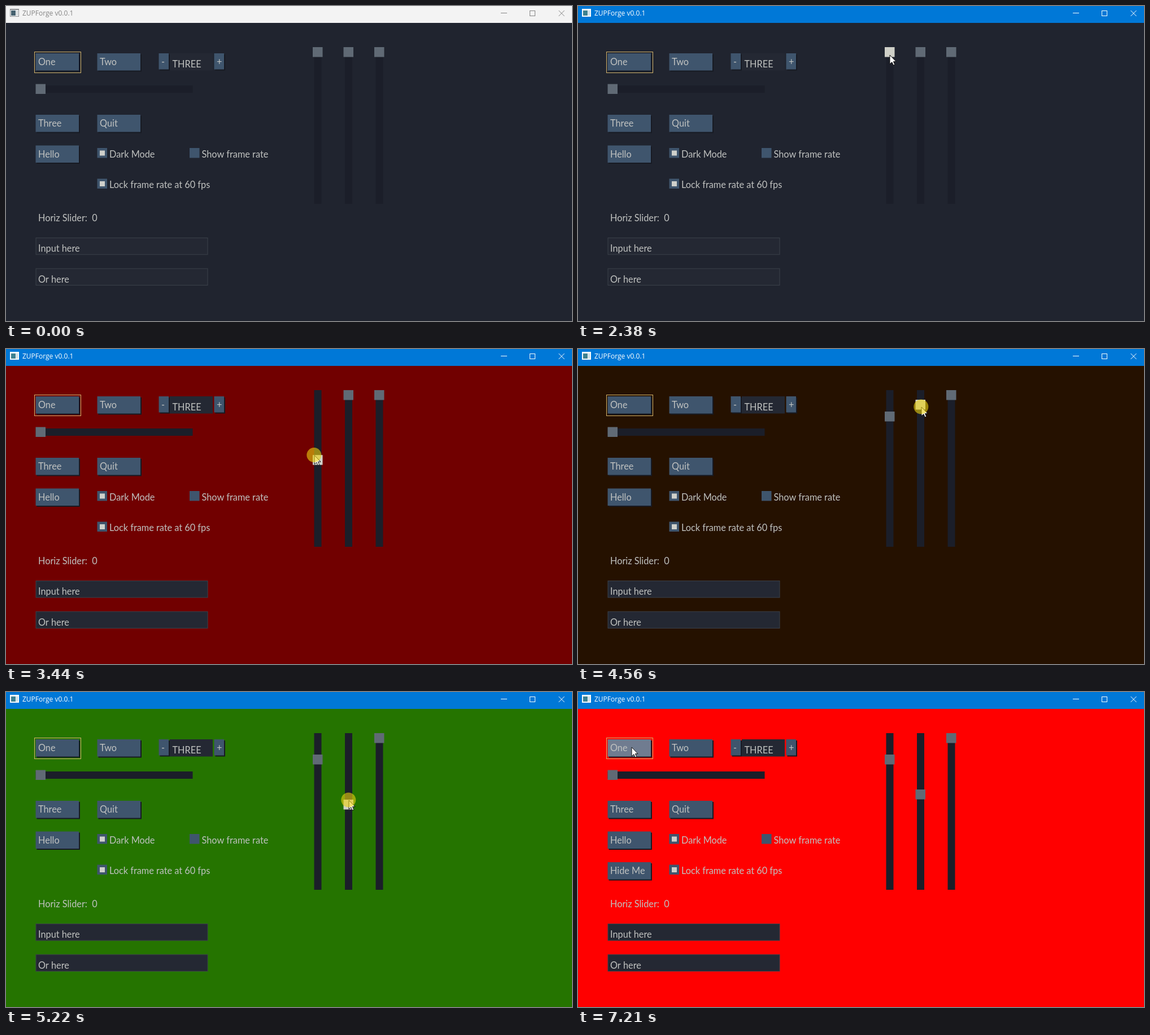
Recreate the animation shown at these times as an HTML page with a canvas. Size 1002 by 559 pixels, loop 8 s.

```html
<!DOCTYPE html>
<html lang="en">
<head>
<meta charset="utf-8">
<title>ZUPForge v0.0.1</title>
<style>
html, body { margin: 0; width: 100%; height: 100%; overflow: hidden; background: #20242f; }
canvas { display: block; }
</style>
</head>
<body>
<canvas id="stage" width="1002" height="559"></canvas>
<script>
const ctx = document.getElementById('stage').getContext('2d');
const LOOP = 8000, START = 320, STEP = 66.2;
const CELL = 54.5, BOX = 17.5, RANGE = 260;

const ACTIVATE = 16, CLICKED = 104;
const DRAGS = [{ from: 34, to: 56 }, { from: 63, to: 78 }, null];
const PRESSES = [{ from: ACTIVATE, to: 24 }, DRAGS[0], DRAGS[1], { from: 103, to: CLICKED }];

// Pointer waypoints: step, x, y
const PATH = [
  [0, 867, 541], [12, 552, 87],
  [16, 552, 87], [22, 552, 189], [31, 552, 87],
  [34, 552, 87], [41, 546, 240], [55, 546, 120],
  [59, 608, 79], [62, 608, 79], [63, 608, 99], [64, 608, 103], [65, 608, 171], [66, 608, 191],
  [69, 608, 228], [72, 608, 228], [73, 607, 200], [74, 607, 192], [77, 607, 182],
  [80, 607, 182], [82, 643, 180], [87, 371, 180],
  [92, 371, 180], [97, 115, 55], [100, 95, 98]
];

const col = i => 52.5 + CELL * i;
const row = j => 29.5 + CELL * j;
const TOP = 73;

function pointerAt(n) {
  const i = PATH.findIndex(p => p[0] > n);
  if (i < 0) return { x: PATH.at(-1)[1], y: PATH.at(-1)[2] };
  const [t0, x0, y0] = PATH[i - 1], [t1, x1, y1] = PATH[i];
  const k = (n - t0) / (t1 - t0);
  return { x: x0 + (x1 - x0) * k, y: y0 + (y1 - y0) * k };
}

// A slider follows the pointer one step late.
function sliderTop(drag, n) {
  if (!drag || n < drag.from) return TOP;
  const y = pointerAt(Math.min(n, drag.to) - 1).y - 9;
  return Math.min(TOP + RANGE, Math.max(TOP, y));
}

const inside = (p, x, y, w, h) => p && p.x >= x && p.x < x + w && p.y >= y && p.y < y + h;
const during = (span, n) => span && n >= span.from && n < span.to;

function rect(x, y, w, h, color) {
  ctx.fillStyle = color;
  ctx.fillRect(x, y, w, h);
}

function frame(x, y, w, h, color) {
  ctx.strokeStyle = color;
  ctx.lineWidth = 1;
  ctx.strokeRect(x + .5, y + .5, w - 1, h - 1);
}

function text(s, x, y, color = '#c0c2c0', font = '16.3px Lato, sans-serif') {
  ctx.font = font;
  ctx.fillStyle = color;
  ctx.fillText(s, x, y);
}

function line(color, x1, y1, x2, y2) {
  ctx.strokeStyle = color;
  ctx.lineWidth = 1;
  ctx.beginPath();
  ctx.moveTo(x1, y1);
  ctx.lineTo(x2, y2);
  ctx.stroke();
}

function button(label, x, y, p, w = 76.5, h = 30.5) {
  rect(x + 2, y + 2, w, h, '#171a23');
  rect(x, y, w, h, inside(p, x, y, w, h) ? '#707c90' : '#3f556d');
  text(label, x + 4.5, y + 21);
}

function checkbox(label, x, y, on) {
  rect(x, y + 4.5, BOX, BOX, '#3f556d');
  if (on) rect(x + 4.5, y + 9, 9, 9, '#cfd0cb');
  text(label, x + 21.5, y + 21);
}

function input(label, x, y) {
  rect(x, y, 305, 30.5, '#3b404a');
  rect(x + 1, y + 1, 303, 28.5, '#242833');
  text(label, x + 4.5, y + 25);
}

function titleBar(active) {
  const ink = active ? '#fff' : '#858585';
  rect(0, 0, 1002, 30, active ? '#0078d7' : '#f3f3f3');
  rect(7, 5, 16, 14, active ? '#fff' : '#8b8d90');
  rect(8, 7, 14, 11, '#f4f6f7');
  rect(9, 8, 8, 9, active ? '#3d8190' : '#46616f');
  rect(18, 8, 3, 9, active ? '#c9dde6' : '#d4d8da');
  text('ZUPForge v0.0.1', 29, 17, ink, '12px "Open Sans", sans-serif');
  line(ink, 876, 12.5, 887, 12.5);
  frame(927, 8, 10, 10, ink);
  line(ink, 978.5, 8, 988.5, 18);
  line(ink, 988.5, 8, 978.5, 18);
}

const ARROW = new Path2D('M0 0V16L3.8 12.6L6.3 18L8.8 17L6.4 11.6H11Z');

function pointer(p, pressed) {
  ctx.save();
  ctx.translate(p.x, p.y);
  ctx.fillStyle = '#fff';
  ctx.strokeStyle = '#111';
  ctx.lineWidth = 1;
  ctx.fill(ARROW);
  ctx.stroke(ARROW);
  if (pressed) {
    ctx.fillStyle = 'rgba(235,208,15,.6)';
    ctx.beginPath();
    ctx.arc(-.7, -.5, 13, 0, Math.PI * 2);
    ctx.fill();
  }
  ctx.restore();
}

function draw(t) {
  const n = Math.floor((t - START) / STEP);
  const p = n < 0 ? null : pointerAt(n);
  const tops = DRAGS.map(d => sliderTop(d, n));
  const [r, g] = tops.map(y => Math.round((y - TOP) / RANGE * 255));
  const clicked = n >= CLICKED;

  rect(0, 0, 1002, 559, clicked ? '#f00' : r || g ? `rgb(${r},${g},0)` : '#20242f');
  titleBar(n >= ACTIVATE);

  button('One', col(0), row(1), p);
  frame(50, 81, 83, 38, '#d3b46c');
  button('Two', col(2), row(1), p);
  button('-', col(4), row(1), p, BOX, 28.5);
  rect(290, row(1), 76, 30.5, '#242833');
  text('THREE', 294.5, row(1) + 25);
  button('+', 368.5, row(1), p, BOX, 28.5);

  rect(col(0), row(2) + 2.5, 278, 13, '#1b1e29');
  rect(col(0), row(2), BOX, BOX, '#606a75');

  button('Three', col(0), row(3), p);
  button('Quit', col(2), row(3), p);
  button('Hello', col(0), row(4), p);
  if (clicked) button('Hide Me', col(0), row(5), p);

  checkbox('Dark Mode', col(2), row(4), true);
  checkbox('Show frame rate', col(5), row(4), false);
  checkbox('Lock frame rate at 60 fps', col(2), row(5), true);
  text('Horiz Slider:  0', col(0) + 4.5, row(6) + 25);
  input('Input here', col(0), row(7));
  input('Or here', col(0), row(8));

  tops.forEach((y, i) => {
    const x = col(9 + i);
    const hot = inside(p, x, y, BOX, BOX) || during(DRAGS[i], n);
    rect(x + 2.5, TOP, 13, 278, '#1b1e29');
    rect(x, y, BOX, BOX, hot ? '#cfd0c8' : '#606a75');
  });

  if (p) pointer(p, PRESSES.some(span => during(span, n)));
}

const began = performance.now();
function tick() {
  draw((performance.now() - began) % LOOP);
  requestAnimationFrame(tick);
}
tick();
</script>
</body>
</html>
```
